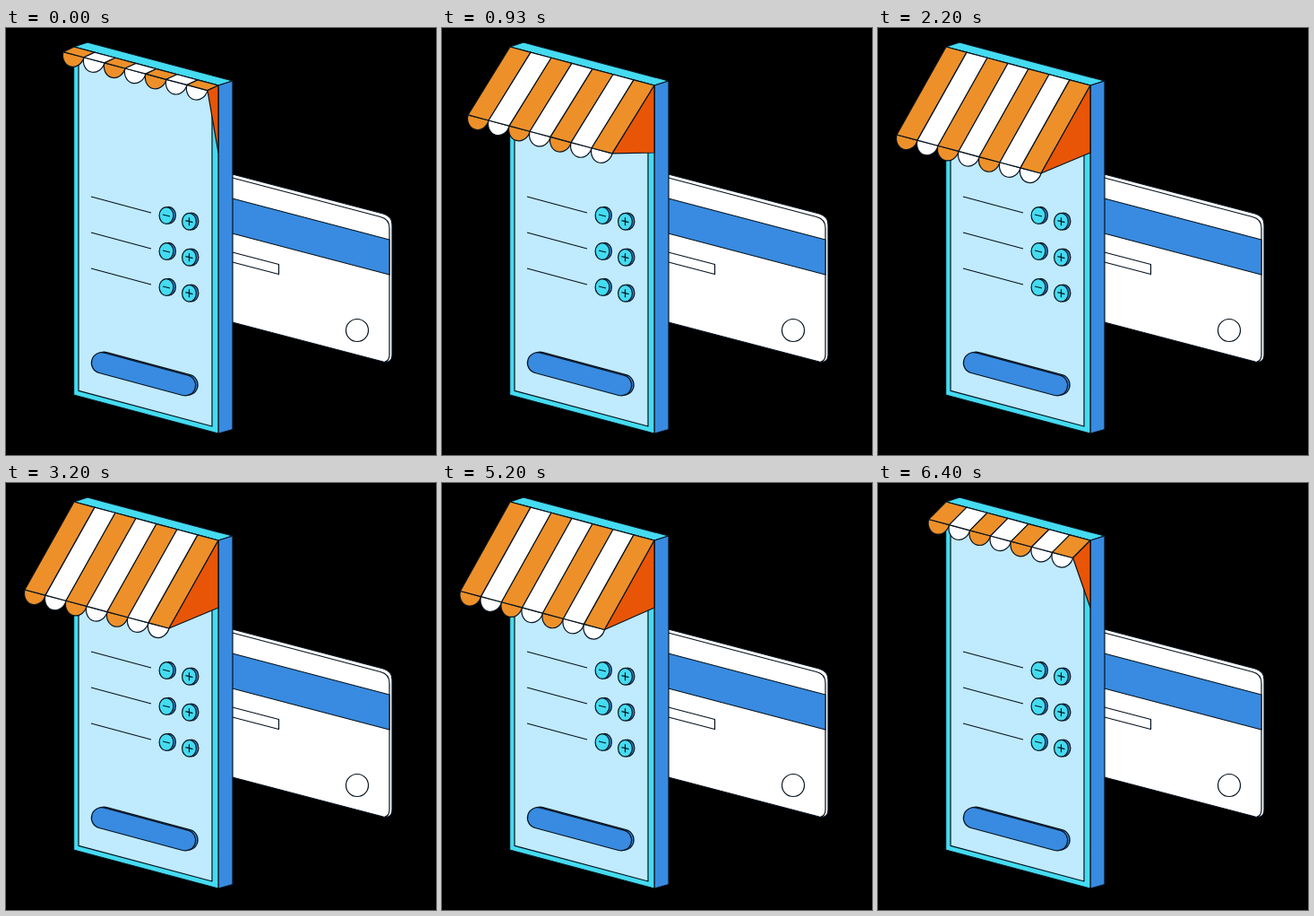
Recreate the animation shown at these times as an HTML page. Size 480 px wide and 476 px high, loop 6470 ms.

```html
<!DOCTYPE html>
<html lang="en">
<head>
<meta charset="utf-8">
<title>Shop awning</title>
<style>
  html, body { margin: 0; height: 100%; overflow: hidden; background: #000; }
  svg { display: block; width: 100vw; height: 100vh; stroke: #07131f; stroke-width: 1.2; stroke-linejoin: round; }
  .white { fill: #fff; }
  .blue { fill: #388be0; }
  .cyan { fill: #45dbf0; }
  .orange { fill: #ee9029; }
  .side { fill: #e95506; }
  .none { fill: none; }
</style>
</head>
<body>
<svg viewBox="0 0 480 476">
  <g id="card">
    <path class="white" d="M245 161L421 207Q431 210 431 219V364Q431 374 421 372L245 326Z"/>
    <path class="none" d="M245 165L418 210.500Q428 213 428 223V364Q428 371 423 372"/>
    <path class="blue" d="M245 188L428 236V275L245 227Z"/>
    <path class="white" d="M245 248L304.500 263.500V274.500L245 259Z"/>
    <circle class="none" cx="392" cy="337" r="12.500"/>
  </g>
  <g id="phone">
    <path class="cyan" d="M75.600 21L91 16L253 59L237 64Z"/>
    <path class="blue" d="M237 64L253 59V447.500L237 452Z"/>
    <path class="cyan" d="M75.600 21L237 64V452L75.600 409Z"/>
    <path fill="#c0eafd" d="M81 28L230 68V444L81 404.300Z"/>
    <g id="rows"></g>
    <g id="pill" stroke-linecap="round"></g>
  </g>
  <g id="awning"></g>
</svg>
<script>
const LOOP = 6470, STRIPES = 7;
const BACK = [76, 21], STEP = [23, 43 / 7];
const $ = id => document.getElementById(id);

function add(parent, tag, attrs) {
  const el = document.createElementNS('http://www.w3.org/2000/svg', tag);
  for (const k in attrs) el.setAttribute(k, attrs[k]);
  return parent.appendChild(el);
}

function button(x, y, plus) {
  const g = add($('rows'), 'g', {});
  add(g, 'ellipse', { class: 'blue', cx: x + 2.5, cy: y - .3, rx: 7.9, ry: 9.4 });
  add(g, 'ellipse', { class: 'cyan', cx: x, cy: y, rx: 7.9, ry: 9.4 });
  add(g, 'path', { d: `M${x - 4} ${y - 1}l8 2` + (plus ? `M${x} ${y - 4.5}v9` : '') });
}

for (const dy of [0, 40, 80]) {
  add($('rows'), 'path', { d: `M95 ${188 + dy}l67 18` });
  button(179, 209 + dy, false);
  button(204.5, 215.7 + dy, true);
}

for (const [dx, dy] of [[2.5, -.5], [0, 0]])
  for (const [stroke, width] of [['#07131f', 24.4], ['#388be0', 22]])
    add($('pill'), 'path', { d: `M${107 + dx} ${373.3 + dy}l93 25`, stroke, 'stroke-width': width });

const cloth = [], scallops = [];
for (let i = 0; i < STRIPES; i++) {
  const odd = i % 2;
  scallops.push(add($('awning'), 'path', { class: odd || i === STRIPES - 1 ? 'white' : 'orange' }));
  cloth.push(add($('awning'), 'path', { class: odd ? 'white' : 'orange' }));
}
const side = add($('awning'), 'path', { class: 'side' });

// Time and offset of the front edge from the back edge
const keys = [
  [0, -12, 5.5], [600, -36, 57], [1330, -54.5, 90.5], [2000, -55, 98], [4700, -55, 98],
  [5200, -55.5, 99.5], [5850, -57, 102], [6400, -19.5, 19.7], [LOOP, -12, 5.5]
];
const rate = (i, k) => (keys[i + 1][k] - keys[i][k]) / (keys[i + 1][0] - keys[i][0]);

function slope(i, k) {
  if (i === 0) return rate(0, k);
  if (i === keys.length - 1) return rate(i - 1, k);
  const a = rate(i - 1, k), b = rate(i, k);
  return a * b > 0 ? 2 * a * b / (a + b) : 0;
}

// Monotone cubic interpolation
function offset(t, k) {
  let i = 0;
  while (t >= keys[i + 1][0]) i++;
  const a = keys[i], b = keys[i + 1], span = b[0] - a[0], p = (t - a[0]) / span;
  const q = 1 - p, s = p * p * (3 - 2 * p);
  return a[k] + (b[k] - a[k]) * s + span * p * q * (slope(i, k) * q - slope(i + 1, k) * p);
}

function frame(now) {
  const t = now % LOOP, dx = offset(t, 1), dy = offset(t, 2);
  const [w, h] = STEP;
  for (let i = 0; i < STRIPES; i++) {
    const x = BACK[0] + w * i, y = BACK[1] + h * i;
    cloth[i].setAttribute('d', `M${x} ${y}l${w} ${h}l${dx} ${dy}l${-w} ${-h}Z`);
    scallops[i].setAttribute('d', `M${x + dx} ${y + dy}a11.9 13.7 15 0 0 ${w} ${h}Z`);
  }
  side.setAttribute('d', `M237 64L${237 + dx} ${64 + dy}L237 139Z`);
  requestAnimationFrame(frame);
}
frame(performance.now());
</script>
</body>
</html>
```
